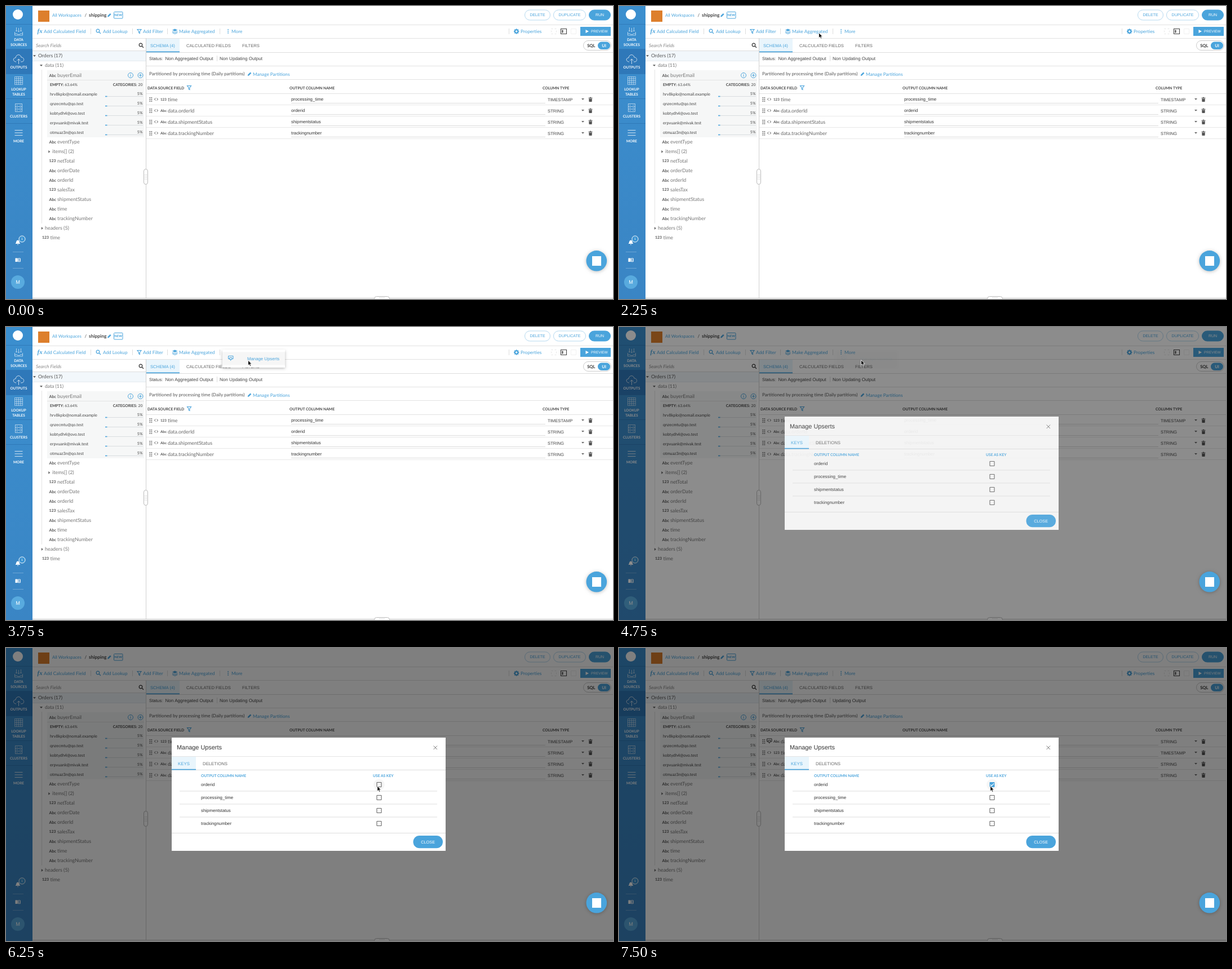
Recreate the animation shown at these times as an HTML page with a canvas. Size 1077 by 520 pixels, loop 8 s.

```html
<!DOCTYPE html>
<html lang="en">
<head>
<meta charset="utf-8">
<title>Workspace outputs</title>
<style>
html, body { margin: 0; width: 100%; height: 100%; overflow: hidden; background: #fff; }
canvas { display: block; width: 1077px; height: 520px; }
</style>
</head>
<body>
<canvas id="stage"></canvas>
<script>
const W = 1077, H = 520, LOOP = 8000;
const BLUE = '#4aa4dc', TINT = '#e9f5fc', INK = '#444', SOFT = '#777', LINE = '#e2e2e2';
const LATO = 'Lato, sans-serif', ARIAL = '"Liberation Sans", sans-serif';
const canvas = document.getElementById('stage');
const c = canvas.getContext('2d');
const dpr = window.devicePixelRatio || 1;
canvas.width = W * dpr;
canvas.height = H * dpr;

// y is the middle of the capitals
function text(s, x, y, size, color = INK, font = LATO, style = '', align = 'left') {
  c.font = `${style} ${size}px ${font}`;
  c.textAlign = align;
  c.fillStyle = color;
  c.fillText(s, x, y + size * 0.355);
}
const bold = (s, x, y, size, color, align) => text(s, x, y, size, color, LATO, 'bold', align);
const arial = (s, x, y, size, color, align) => text(s, x, y, size, color, ARIAL, '', align);

function rect(x, y, w, h, color) {
  c.fillStyle = color;
  c.fillRect(x, y, w, h);
}
const hline = (x1, x2, y, color = LINE) => rect(x1, y, x2 - x1, 1, color);
const vline = (x, y1, y2, color = LINE) => rect(x, y1, 1, y2 - y1, color);

function paint(fill, stroke, width = 1) {
  if (fill) { c.fillStyle = fill; c.fill(); }
  if (stroke) { c.strokeStyle = stroke; c.lineWidth = width; c.stroke(); }
}
function round(x, y, w, h, r, fill, stroke, width) {
  c.beginPath();
  c.roundRect(x, y, w, h, r);
  paint(fill, stroke, width);
}
function disc(x, y, r, fill, stroke, width) {
  c.beginPath();
  c.arc(x, y, r, 0, Math.PI * 2);
  paint(fill, stroke, width);
}
function shape(d, x, y, fill, stroke, width) {
  c.save();
  c.translate(x, y);
  const p = new Path2D(d);
  if (fill) { c.fillStyle = fill; c.fill(p); }
  if (stroke) { c.strokeStyle = stroke; c.lineWidth = width || 1; c.stroke(p); }
  c.restore();
}
function shadowed(blur, dy, alpha, draw) {
  c.save();
  c.shadowColor = `rgba(0,0,0,${alpha})`;
  c.shadowBlur = blur * dpr;
  c.shadowOffsetY = dy * dpr;
  draw();
  c.restore();
}

const arrowDown = (x, y, color = '#555') => shape('M-2.5-1.2H2.5L0 1.6Z', x, y, color);
const arrowRight = (x, y) => shape('M-1.2-2.5V2.5L1.8 0Z', x, y, '#666');
const pencil = (x, y) => shape('M0 7L.7 4.6L4.8.5L6.6 2.3L2.4 6.4Z', x, y, BLUE);
const funnel = (x, y) => shape('M0 0H7L4.4 3.4V7L2.6 6V3.4Z', x, y, null, BLUE, 1.1);
const lens = (x, y, color) => shape('M5.8 3a2.8 2.8 0 1 1-5.6 0a2.8 2.8 0 1 1 5.6 0M5 5L8 8', x, y, null, color, 1.2);
const keyIcon = (x, y, color) =>
  shape('M2.5 5H1V0H9.5V5H8M3 3H7.5V6H3ZM5.2 6V8.5', x, y, null, color, 1);

function dots(x, y, cols, rows, gap, size, color) {
  for (let i = 0; i < cols * rows; i++)
    rect(x + (i % cols) * gap, y + Math.floor(i / cols) * gap, size, size, color);
}

function sidebar() {
  const g = c.createLinearGradient(0, 0, 0, H);
  g.addColorStop(0, '#3b8fcf');
  g.addColorStop(1, '#3a85c4');
  rect(0, 0, 47, H, g);
  rect(0, 77, 47, 43, '#2f78b9');
  for (let y = 32; y < 210; y += 44) hline(0, 47, y, 'rgba(20,80,140,.3)');
  disc(21, 15, 9, '#fff');

  const label = (s, y) => bold(s, 22.5, y, 6.4, '#fff', 'center');
  label('DATA', 60); label('SOURCES', 68.5);
  label('OUTPUTS', 108.5);
  label('LOOKUP', 148); label('TABLES', 156.5);
  label('CLUSTERS', 196);
  label('MORE', 240);

  const ice = 'rgba(255,255,255,.72)';
  shape('M0 8V14H14V8M0 11H4L5 12.5H9L10 11H14M3 0V7M7 1V8M11 0V7M1.5 5.5L3 7L4.5 5.5M5.5 6.5L7 8L8.5 6.5M9.5 5.5L11 7L12.5 5.5', 15.5, 38, null, ice, .8);
  shape('M5 13H4C-1 12-1 6 4 6C5-1 13-1 14 5C20 5 20 13 15 13H13M9.5 17V8M6.5 11L9.5 8L12.5 11', 13, 86, null, ice, 1);
  shape('M0 0H14V14H0ZM0 3.5H14M0 7H14M0 10.5H14M3.5 0V14M7 0V14M10.5 0V14', 15.5, 125.5, null, ice, .7);
  shape('M0 0H12V14H0ZM0 5H12M0 9.5H12M2 2.5H4M2 7.2H4M2 11.8H4M8 2.5H10M8 7.2H10M8 11.8H10', 16.5, 173.5, null, ice, .8);
  for (const y of [220, 224.5, 229]) rect(15.5, y, 14, 1.1, ice);

  shape('M0 7C2 6 1 1 4.5.5C8 1 7 6 9 7ZM3.3 8H5.7L4.5 9.3Z', 16.5, 415, '#fff');
  disc(28.5, 413.5, 5.5, '#3b93d2', '#fff', 1);
  text('1', 28.5, 413.5, 5.5, '#fff', ARIAL, '', 'center');
  hline(12, 31, 436, 'rgba(255,255,255,.25)');
  rect(16.5, 447.5, 4, 6.5, '#fff');
  round(21.5, 448, 3.8, 5.6, 0, null, '#fff', 1);
  hline(22, 25, 450.5, '#fff');
  hline(12, 31, 465, 'rgba(255,255,255,.25)');
  disc(21, 490, 12, '#58aade');
  arial('M', 21, 490, 9.2, '#fff', 'center');
}

function topBar() {
  rect(57, 8, 20, 20, '#dd7f2c');
  text('All Workspaces', 82, 16, 7.7, BLUE);
  text('/', 139.5, 16, 8, '#444');
  bold('shipping', 147, 16, 8.4, '#444');
  pencil(180, 12.5);
  round(191.5, 10.5, 15.5, 11.5, 1, null, BLUE, 1);
  bold('NEW', 199.2, 16.3, 5.8, BLUE, 'center');
  const pill = (s, x, w, solid) => {
    round(x + .5, 7, w - 1, 18, 9, solid ? BLUE : '#fff', solid ? BLUE : '#b5d9f0', 1);
    arial(s, x + w / 2, 16, 7, solid ? '#fff' : BLUE, 'center');
  };
  pill('DELETE', 920, 46);
  pill('DUPLICATE', 971, 58);
  pill('RUN', 1034, 39, true);
  hline(47, W, 33);
}

function toolbar() {
  const tool = (s, x) => text(s, x, 45, 8.25, BLUE);
  text('fx', 55.5, 44, 11, BLUE, '"Liberation Serif", serif', 'italic bold');
  tool('Add Calculated Field', 67);
  lens(160, 41, BLUE);
  tool('Add Lookup', 172);
  funnel(233, 41.5);
  tool('Add Filter', 243);
  shape('M0 2.3L4.7 0L9.4 2.3L4.7 4.6Z', 295, 40.5, BLUE);
  shape('M0 0L4.7 2.3L9.4 0M0 2.2L4.7 4.5L9.4 2.2', 295, 45, null, BLUE, 1);
  tool('Make Aggregated', 307);
  dots(393.3, 41, 1, 3, 3, 1.6, BLUE);
  tool('More', 400);
  for (const x of [150, 224, 286, 379, 892]) vline(x, 40, 50, '#ddd');
  disc(905.7, 45, 2.7, null, BLUE, 2);
  for (let i = 0; i < 8; i++) {
    c.save();
    c.translate(905.7, 45);
    c.rotate(i * Math.PI / 4);
    rect(-.9, -4.7, 1.8, 1.8, BLUE);
    c.restore();
  }
  tool('Properties', 913);
  c.setLineDash([3, 3]);
  round(967.5, 40.5, 9, 9, 0, null, '#e6e6e6', 1);
  c.setLineDash([]);
  round(984.5, 40.5, 10, 9, 0, null, '#444', 1.1);
  rect(986.5, 42.5, 2, 5, '#444');
  round(1002.5, 40.5, 9, 9, 0, null, '#f0f0f0', 1);
  rect(1019, 37, 54, 16, BLUE);
  shape('M0 0L5.5 3L0 6Z', 1028.5, 42, '#fff');
  arial('PREVIEW', 1038, 45, 6.4, '#fff');
  hline(47, W, 57);
}

function fieldTree() {
  text('Search Fields', 53, 70, 8.4, '#888', LATO, 'italic');
  lens(236, 66, '#333');
  hline(47, 248, 79, '#ddd');
  rect(47, 80, 201, 17, '#f2f7fb');
  hline(47, 248, 97, '#e4eaef');
  arrowDown(50.5, 88.5);
  text('Orders (17)', 57, 88, 8.7, '#555');
  arrowDown(62.5, 105.5);
  text('data (11)', 69, 105, 8.6, SOFT);
  vline(63, 113, 386, '#e4e4e4');

  rect(73, 114, 172, 119, '#f6f7f7');
  bold('Abc', 76.5, 123, 7.2, '#555');
  text('buyerEmail', 91, 123, 8.9, SOFT);
  disc(221, 123, 4.5, null, BLUE, 1);
  rect(220.5, 122.2, 1, 3.2, BLUE);
  rect(220.5, 120.3, 1, 1.1, BLUE);
  disc(238.5, 123, 4.5, null, BLUE, 1);
  rect(236, 122.5, 5, 1, BLUE);
  rect(238, 120.5, 1, 5, BLUE);
  hline(73, 245, 131, '#e3e3e3');
  bold('EMPTY:', 78, 139.5, 6.8);
  text('63.64%', 104.3, 139.5, 6.7);
  text('20', 242.5, 139.5, 6.8, INK, LATO, '', 'right');
  bold('CATEGORIES:', 232.5, 139.5, 6.8, INK, 'right');
  ['hrv8kplo@nomail.example', 'qnzecmtu@qo.test', 'kobtydh4@ovo.test', 'erpvuank@mivak.test', 'otmuaz3n@qo.test']
    .forEach((mail, i) => {
      const y = 156 + i * 17;
      text(mail, 78, y, 7.25);
      text('5%', 242.5, y, 7, INK, LATO, '', 'right');
      hline(176, 243, y + 4, '#d9dde0');
      rect(176, y + 3.7, 3.5, 1.6, BLUE);
    });

  const field = (kind, s, y, x = 91) => {
    bold(kind, x - 14.5, y, kind === 'Abc' ? 7.2 : 6.9, '#555');
    text(s, x, y, 8.9, SOFT);
  };
  field('Abc', 'eventType', 241);
  arrowRight(76.5, 258.5);
  text('items[] (2)', 82, 258, 8.9, SOFT);
  field('123', 'netTotal', 275);
  field('Abc', 'orderDate', 292);
  field('Abc', 'orderId', 309);
  field('123', 'salesTax', 326);
  field('Abc', 'shipmentStatus', 343);
  field('Abc', 'time', 360);
  field('Abc', 'trackingNumber', 377);
  arrowRight(64, 394.5);
  text('headers (5)', 69, 394, 8.9, SOFT);
  field('123', 'time', 411, 78.5);

  vline(248, 57, 518, '#cfcfcf');
  round(244.5, 289.5, 7, 27, 3.5, '#fff', '#bbb', 1);
  dots(246.4, 299, 2, 4, 2.6, 1, '#bbb');
}

function toggle() {
  round(1024.5, 61.5, 49, 17, 8.5, '#fff', '#ccc', 1);
  bold('SQL', 1038.3, 70, 7.6, '#333', 'center');
  round(1050, 63.5, 22, 13.5, 6.7, BLUE);
  bold('UI', 1061, 70, 7.4, '#fff', 'center');
}

function tableRow([kind, name, output, type], i, isKey) {
  const y = 165.5 + i * 20;
  dots(254.5, y - 3.5, 2, 3, 3, 1.7, '#666');
  if (isKey) keyIcon(261.5, y - 4.5, '#444');
  else shape('M2.5-2L.3 0L2.5 2M4.5-2L6.7 0L4.5 2', 263, y, null, '#555', 1);
  bold(kind, 274, y, kind === 'Abc' ? 6.3 : 6.2, '#555');
  text(name, 287, y, 8.9, '#666');
  arial(output, 506, y - .7, 7.85, '#333');
  hline(506, 957, y + 6.5, '#dcdcdc');
  arial(type, 961, y + .5, 7.7, '#444');
  arrowDown(1023.5, y - .3, '#666');
  shape('M0 1.2H2.3V.2H4.7V1.2H7V2.2H0ZM.6 3H6.4L6 8.5H1Z', 1033.5, y - 4, '#555');
  hline(249, W, y + 9.5, '#e8e8e8');
}

function mainPane(updated) {
  rect(249, 58, 59, 24, TINT);
  hline(249, W, 82, '#ddd');
  rect(249, 80.5, 59, 1.7, BLUE);
  arial('SCHEMA (4)', 256, 70, 7.65, BLUE);
  arial('CALCULATED FIELDS', 320, 70, 7.65, '#666');
  arial('FILTERS', 419, 70, 7.65, '#666');
  toggle();
  arial('Status:', 254, 93, 7.8);
  arial('Non Aggregated Output', 282.5, 93, 8.1);
  vline(374, 88, 98, '#ddd');
  arial(updated ? 'Updating Output' : 'Non Updating Output', 379, 93, 8.1);
  hline(249, W, 106);
  text('Partitioned by processing time (Daily partitions)', 254, 120.5, 8.17, '#555');
  pencil(428.7, 117);
  text('Manage Partitions', 438, 120.8, 8.2, BLUE);
  hline(249, W, 130);
  bold('DATA SOURCE FIELD', 251, 145.5, 6.7);
  funnel(321.5, 141.5);
  bold('OUTPUT COLUMN NAME', 503, 145.5, 6.7);
  bold('COLUMN TYPE', 952, 145.5, 6.7);
  hline(249, W, 155);

  const rows = [
    ['123', 'time', 'processing_time', 'TIMESTAMP'],
    ['Abc', 'data.orderId', 'orderid', 'STRING'],
    ['Abc', 'data.shipmentStatus', 'shipmentstatus', 'STRING'],
    ['Abc', 'data.trackingNumber', 'trackingnumber', 'STRING']
  ];
  if (updated) rows.unshift(rows.splice(1, 1)[0]);
  rows.forEach((row, i) => tableRow(row, i, updated && i === 0));

  hline(47, W, 518, '#c4c4c4');
  round(653.5, 515.5, 27, 8, 4, '#fff', '#bbb', 1);
  dots(662.5, 517, 4, 1, 2.6, 1, '#bbb');
}

function menu(alpha) {
  c.save();
  c.globalAlpha = alpha;
  shadowed(5, 1.5, .28, () => rect(384, 40, 111, 32, '#fff'));
  rect(384, 44.5, 111, 23, '#f6f6f6');
  keyIcon(393.5, 51.5, BLUE);
  arial('Manage Upserts', 428, 56.3, 7.8, BLUE);
  c.restore();
}

function dialog(alpha, t) {
  c.save();
  c.globalAlpha = alpha;
  rect(294, 159, 486, 201, '#fff');
  arial('Manage Upserts', 303, 176, 10.9, '#333');
  shape('M0 0L6.4 6.4M6.4 0L0 6.4', 758.6, 173.6, null, '#777', 1);
  hline(294, 780, 192, '#e4e4e4');
  rect(294, 193, 43, 23, TINT);
  hline(294, 780, 216, '#ddd');
  rect(294, 214.8, 43, 1.7, BLUE);
  arial('KEYS', 315.5, 204.8, 7.8, BLUE, 'center');
  arial('DELETIONS', 371, 204.8, 7.75, '#666', 'center');
  bold('OUTPUT COLUMN NAME', 346, 226.5, 6.7, BLUE);
  bold('USE AS KEY', 651, 226.5, 6.7, BLUE);

  if (t >= 6250) disc(662, 242.5, 10, 'rgba(0,0,0,.035)');
  ['orderid', 'processing_time', 'shipmentstatus', 'trackingnumber'].forEach((name, i) => {
    const y = 242.5 + i * 23;
    arial(name, 346, y, 7.85, '#333');
    if (i === 0 && t >= 6750) {
      round(657.5, y - 4.5, 9, 9, 1, BLUE);
      shape('M1.5 4.5L3.7 6.7L7.7 2.3', 657.5, y - 4.5, null, '#fff', 1.2);
    } else {
      round(658, y - 4, 8, 8, .6, null, '#666', 1.1);
    }
    if (i < 3) hline(308, 765, y + 11, '#ddd');
  });
  hline(294, 780, 328, '#ddd');
  round(722.5, 333, 52.5, 22.3, 11.1, BLUE);
  arial('CLOSE', 748.7, 344.2, 7.4, '#fff', 'center');
  c.restore();
}

function chatButton() {
  shadowed(6, 1, .25, () => disc(1047.8, 452.3, 18.3, BLUE));
  rect(1040, 444, 16, 17, '#fff');
}

// [time, x, y]: the pointer jumps to each place and rests there
const POINTER = [
  [750, 470, 66], [1000, 452, 69], [1250, 385, 59], [1500, 359, 50], [1750, 358, 49],
  [2250, 354.5, 47.5], [2500, 389, 50], [2750, 415, 49], [3250, 421, 56], [3750, 429.5, 59],
  [4750, 429.5, 58.5], [5500, 613, 315], [5750, 710, 283], [6000, 668, 250], [6250, 658.8, 245]
];
function pointer(t) {
  const at = POINTER.filter(p => p[0] <= t).pop();
  if (!at) return;
  shape('M0 0V9.2L2.1 7.3L3.6 10.5L5.2 9.8L3.8 6.7H6.6Z', at[1], at[2], '#111', '#fff', .8);
}

function draw(t) {
  c.setTransform(dpr, 0, 0, dpr, 0, 0);
  c.textBaseline = 'alphabetic';
  c.textRendering = 'geometricPrecision';
  rect(0, 0, W, H, '#fff');
  topBar();
  toolbar();
  fieldTree();
  mainPane(t >= 7250);
  sidebar();
  if (t >= 3250 && t < 5000) menu(t < 4750 ? 1 : .06);
  if (t >= 4750) {
    const shown = t < 5000 ? .9 : 1;
    rect(0, 0, W, H, `rgba(0,0,0,${.5 * shown})`);
    dialog(shown, t);
  }
  chatButton();
  pointer(t);
}

const start = performance.now();
function tick() {
  draw((performance.now() - start) % LOOP);
  requestAnimationFrame(tick);
}
tick();
</script>
</body>
</html>
```
